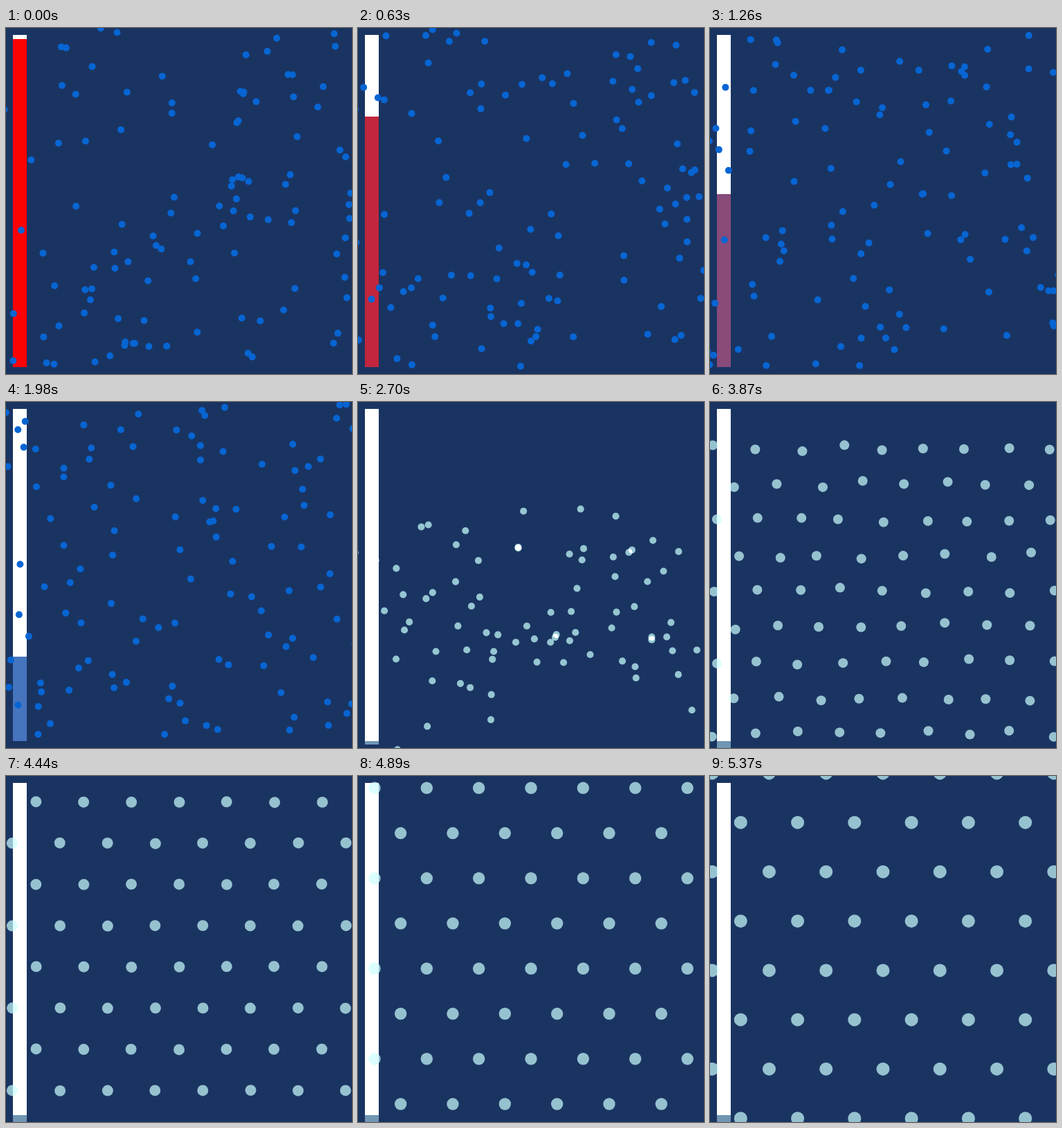
An HTML page with a canvas that plays this animation: 500 by 500 pixels, repeating every 5400 ms.

```html
<!DOCTYPE html>
<html lang="en">
<head>
<meta charset="utf-8">
<title>Cooling particles</title>
<style>
  html, body { margin: 0; width: 100%; height: 100%; overflow: hidden; background: #1a3462; }
  canvas { display: block; width: 500px; height: 500px; }
</style>
</head>
<body>
<canvas id="stage" width="500" height="500"></canvas>
<script>
const ctx = document.getElementById('stage').getContext('2d');
const STEP = 30, STEPS = 180, LIQUID = 90, SOLID = 120;
const COL = 25 * Math.sqrt(3), ROW = 37.5;
const ROWS = 9, COLS = 13;
const MID_X = 250, MID_Y = 266.25;
const HALF_W = COLS * COL / 2, HALF_H = (ROWS - 1) * ROW / 2;
const BAR = { x: 10, y: 10, w: 20, h: 480 };

let seed = 20;
function random() {
  seed = (seed * 1664525 + 1013904223) % 4294967296;
  return seed / 4294967296;
}
const spread = r => (random() * 2 - 1) * r;
const clamp = v => Math.max(0, Math.min(1, v));
const smooth = v => v * v * (3 - 2 * v);

// Bounces an offset between -half and half.
function fold(v, half) {
  const span = 2 * half;
  const m = (((v + half) % (2 * span)) + 2 * span) % (2 * span);
  return (m > span ? 2 * span - m : m) - half;
}

// A sum of two slow waves, within about -1 to 1.
function wobble() {
  const a = random() * 7, b = random() * 7;
  const f = 1.5 + random() * 2, g = 3 + random() * 3;
  return s => 0.65 * Math.sin(a + f * s) + 0.45 * Math.sin(b + g * s);
}

// Lattice places as offsets from the middle.
const dots = [];
for (let r = 0; r < ROWS; r++) {
  const odd = r % 2;
  for (let c = 0; c < COLS + odd; c++) {
    dots.push({
      x: (c - (COLS - 1 + odd) / 2) * COL,
      y: r * ROW - HALF_H,
      vx: spread(420), vy: spread(420),
      wx: wobble(), wy: wobble(),
      sink: 170 * Math.pow(random(), 3)
    });
  }
}

function zoomAt(i) {
  return 1 + 0.01 * Math.max(0, i - LIQUID + 1);
}

function place(dot, i) {
  const heat = clamp((LIQUID - i) / LIQUID);
  const calm = 1 - clamp((i - LIQUID) / (STEPS - LIQUID));
  const gas = smooth(clamp((LIQUID - i) / 25));
  const drift = heat * (0.35 + 0.65 * heat);
  const shake = 52 * Math.pow(calm, 4.8) * (1 - gas);
  const s = i * STEP / 1000;

  // The liquid is flatter and wider than the lattice; the gas fills the stage.
  const wide = 1 + 0.22 * Math.pow(calm, 7) * (1 - gas);
  const flat = 1 - 0.33 * Math.pow(calm, 5);
  const tall = flat + (1.64 - flat) * gas;
  const sink = dot.sink * Math.pow(calm, 10) * (1 - gas) - 23 * gas;

  const x = fold(dot.x + dot.vx * drift, HALF_W) * wide + shake * dot.wx(s);
  const y = fold(dot.y + dot.vy * drift, HALF_H) * tall + shake * dot.wy(s) + sink;
  const zoom = zoomAt(i);
  return [250 + (MID_X + x - 250) * zoom, 250 + (MID_Y + y - 250) * zoom];
}

function rect(color, x, y, w, h) {
  ctx.fillStyle = color;
  ctx.fillRect(x, y, w, h);
}

function drawBar(i) {
  const k = (i + 1) / LIQUID;
  const cut = Math.ceil(BAR.h * Math.min(1, k));
  if (k <= 1) {
    const color = `rgb(${255 - 249 * k}, ${157 * k}, ${255 * k})`;
    rect(color, BAR.x, BAR.y + cut, BAR.w, BAR.h - cut);
  } else {
    rect('#7096b4', BAR.x, BAR.y + BAR.h, BAR.w, Math.floor(BAR.h * (k - 1)));
  }
  rect('#fff', BAR.x, BAR.y, BAR.w, cut);
}

function drawDots(i, color, blend) {
  const radius = 5 * zoomAt(i);
  ctx.globalCompositeOperation = blend;
  ctx.fillStyle = color;
  for (const dot of dots) {
    const [x, y] = place(dot, i);
    ctx.beginPath();
    ctx.arc(x, y, radius, 0, Math.PI * 2);
    ctx.fill();
  }
  ctx.globalCompositeOperation = 'source-over';
}

function draw(i) {
  rect('#1a3462', 0, 0, 500, 500);
  drawBar(i);
  if (i < LIQUID) drawDots(i, '#0765d3', 'source-over');
  else if (i < SOLID) drawDots(i, 'rgb(124, 146, 112)', 'lighter');
  else drawDots(i, 'rgba(204, 255, 255, 0.7)', 'source-over');
}

const start = performance.now();
function tick() {
  const t = Math.max(0, performance.now() - start);
  draw(Math.floor(t / STEP) % STEPS);
  requestAnimationFrame(tick);
}
tick();
</script>
</body>
</html>
```
